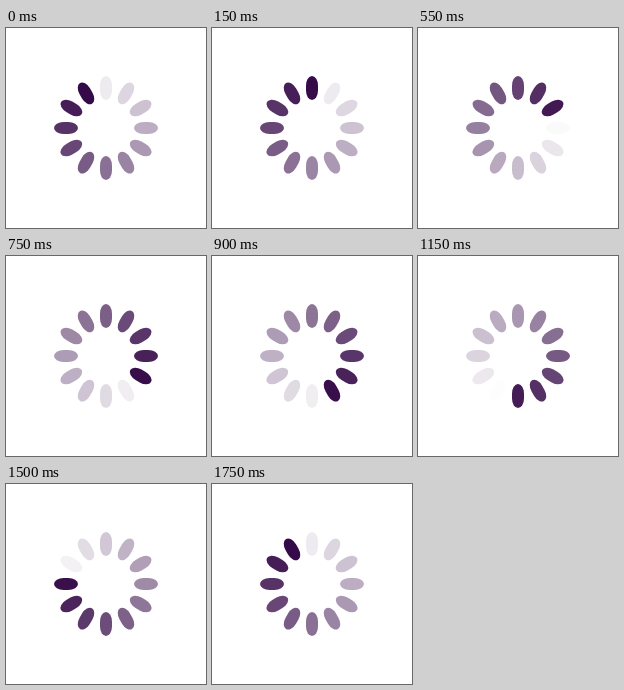
An HTML page with a canvas for the animation above (1800 ms loop, 200 by 200 pixels).

```html
<!DOCTYPE html>
<html lang="en">
<head>
<meta charset="utf-8">
<title>Spinner</title>
<style>
  html, body { margin: 0; width: 100%; height: 100%; overflow: hidden; background: #fff; }
  canvas { display: block; width: 200px; height: 200px; }
</style>
</head>
<body>
<canvas id="stage" width="200" height="200"></canvas>
<script>
const ctx = document.getElementById('stage').getContext('2d');
const LOOP = 1800, STEP = 50, BLADES = 12;
const LAST_STEP = LOOP / STEP - 1; // the last step repeats the first pose

// Upright blade with elliptical corners and short straight sides.
const blade = new Path2D();
blade.ellipse(0, -42.4, 6, 9.6, 0, Math.PI, 2 * Math.PI);
blade.ellipse(0, -37.6, 6, 9.6, 0, 0, Math.PI);
blade.closePath();

function draw(time) {
  const step = Math.floor((time % LOOP) / STEP) % LAST_STEP;
  ctx.globalAlpha = 1;
  ctx.fillStyle = '#fff';
  ctx.fillRect(0, 0, 200, 200);
  ctx.fillStyle = '#350a48';
  for (let i = 0; i < BLADES; i++) {
    // Integer arithmetic keeps the wrap from clear to solid exact.
    const total = LAST_STEP * BLADES;
    const age = (step * BLADES + (BLADES - 1 - i) * LAST_STEP) % total;
    ctx.save();
    ctx.translate(100, 100);
    ctx.rotate(i * 2 * Math.PI / BLADES);
    ctx.globalAlpha = 1 - age / total;
    ctx.fill(blade);
    ctx.restore();
  }
}

let start;
function tick(now) {
  start ??= now;
  draw(Math.max(0, now - start));
  requestAnimationFrame(tick);
}
draw(0);
requestAnimationFrame(tick);
</script>
</body>
</html>
```
